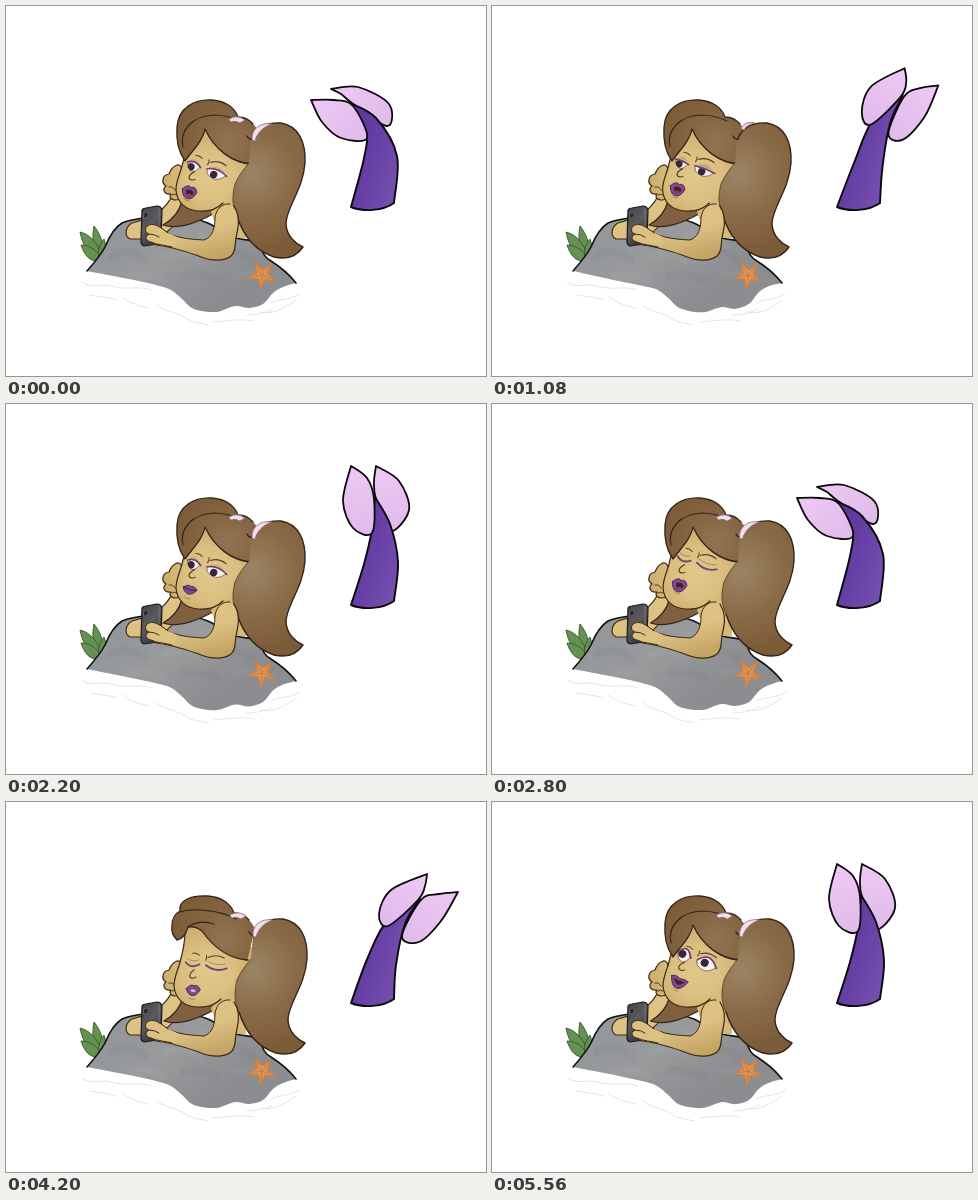
Write an HTML page with a canvas that moves like this. It is 480 px wide and 370 px high and loops after 5600 ms.

```html
<!DOCTYPE html>
<html lang="en">
<head>
<meta charset="utf-8">
<title>Mermaid on a rock</title>
<style>
  html, body { margin: 0; width: 100%; height: 100%; overflow: hidden; background: #fff; }
  canvas { display: block; width: 480px; height: 370px; }
</style>
</head>
<body>
<canvas id="stage"></canvas>
<script>
const LOOP = 5600;
const canvas = document.getElementById('stage');
const ctx = canvas.getContext('2d');
const dpr = window.devicePixelRatio || 1;
canvas.width = 480 * dpr;
canvas.height = 370 * dpr;

const SKIN_LINE = '#3d2b12', HAIR_LINE = '#33241a', TAIL_LINE = '#0c080e';

function withStops(g, stops) {
  stops.forEach((c, i) => g.addColorStop(i / (stops.length - 1), c));
  return g;
}
const radial = (x, y, r, ...stops) => withStops(ctx.createRadialGradient(x, y, 4, x, y, r), stops);
const linear = (x0, y0, x1, y1, ...stops) => withStops(ctx.createLinearGradient(x0, y0, x1, y1), stops);

const hairPaint = radial(246, 168, 80, '#9a8362', '#8a6b48', '#7c5b38');
const capPaint = radial(222, 138, 62, '#8f7350', '#84633f', '#795835');
const skinPaint = radial(204, 170, 48, '#e0c78a', '#dabf80', '#cbab6a');
const armPaint = linear(175, 200, 190, 256, '#dfc384', '#dcc183', '#c4a363');
const rockPaint = linear(120, 212, 190, 305, '#94979a', '#989a9c', '#8b8d90');
const tailPaint = linear(345, 150, 396, 165, '#5f389f', '#6842a6', '#7450ae');

function shape(d, fill, line, width = 1.2) {
  const p = typeof d === 'string' ? new Path2D(d) : d;
  if (fill) { ctx.fillStyle = fill; ctx.fill(p); }
  if (line) { ctx.strokeStyle = line; ctx.lineWidth = width; ctx.stroke(p); }
}
function moved(dx, dy, draw, rot = 0) {
  ctx.save();
  ctx.translate(dx, dy);
  ctx.rotate(rot);
  draw();
  ctx.restore();
}

// Smooth curve through points, with free ends.
function curve(path, pts, start = true) {
  if (start) path.moveTo(...pts[0]);
  for (let i = 0; i < pts.length - 1; i++) {
    const a = pts[i - 1] || pts[i], b = pts[i], c = pts[i + 1], d = pts[i + 2] || c;
    path.bezierCurveTo(
      b[0] + (c[0] - a[0]) / 6, b[1] + (c[1] - a[1]) / 6,
      c[0] - (d[0] - b[0]) / 6, c[1] - (d[1] - b[1]) / 6, c[0], c[1]);
  }
  return path;
}
const points = s => s.split(' ').map(p => p.split(',').map(Number));
const mix = (a, b, k) => a + (b - a) * k;

// Tail poses: body (left edge, tip, right edge) and the two fins.
const pose = (body, a, b) => ({ body: points(body), a: points(a), b: points(b) });
const left = pose('358,152 360,125 344,97 370,112 391,150',
  '305,94 316,116 335,132 361,132 347,100 328,94', '325,83 352,81 383,98 381,120 346,97 335,88');
const upright = pose('358,160 366,125 369,93 384,120 392,158',
  '345,62 337,97 347,124 366,129 368,95 361,74', '370,62 393,77 403,106 384,127 370,95 368,78');
const lean = pose('362,160 380,120 406,90 396,125 391,160',
  '400,60 370,82 365,110 374,123 404,92 407,76', '438,76 429,111 409,136 397,131 407,93 420,80');
const leanMore = pose('362,155 381,119 414,97 399,122 390,163',
  '421,72 385,88 373,112 382,124 412,98 419,84', '452,90 435,119 413,140 396,134 415,98 433,92');
const right = pose('356,155 382,121 432,105 406,120 389,160',
  '449,96 421,88 391,98 383,122 410,107 436,103', '470,117 449,139 426,144 402,137 427,108 447,108');

function between(p, q, k, lift) {
  const blend = (u, v) => u.map(([x, y], i) => [
    mix(x, v[i][0], k), mix(y, v[i][1], k) - (y < 145 ? lift : 0)]);
  return { body: blend(p.body, q.body), a: blend(p.a, q.a), b: blend(p.b, q.b) };
}
const tails = [left, between(left, upright, .6, 8), upright, lean,
  between(lean, leanMore, .6, 5), leanMore, right];

function tailAt(t) {
  // The first swing rests on the left; the second starts at 2960.
  if (t >= 2600 && t < 2960) return left;
  const n = t < 2600 ? Math.max(0, Math.floor(t / 200) - 1)
                     : Math.floor((t - 2960) / 200) + 1;
  const k = n % 12;
  return tails[k > 6 ? 12 - k : k];
}

function drawTail(t) {
  const { body, a, b } = tailAt(t);
  const fin = pts => {
    const p = curve(new Path2D(), [...pts, pts[0]]);
    p.closePath();
    shape(p, linear(...pts[0], ...pts[3], '#efc9f4', '#e0bbea'), TAIL_LINE, 1.8);
  };
  fin(b);
  const p = curve(new Path2D(), [[345, 201], ...body.slice(0, 3)]);
  curve(p, [...body.slice(2), [388, 197]], false);
  p.bezierCurveTo(377, 205, 357, 206, 345, 201);
  p.closePath();
  shape(p, tailPaint, TAIL_LINE, 1.9);
  fin(a);
}

function drawRock(t) {
  const w = Math.sin(t / LOOP * Math.PI * 8);
  const blade = d => shape(d, '#659252', '#36582d', .9);
  blade('M94 255C86 242 86 230 88 220C97 231 98 242 97 254Z');
  blade('M94 255C80 248 76 236 74 226C87 229 94 242 97 254Z');
  blade('M95 255C83 257 78 248 75 239C86 239 93 247 97 254Z');
  blade('M94 255C90 246 94 238 98 233C101 241 100 249 97 256Z');

  const rim = 'M81 265C88 257 95 249 99 241C103 231 108 222 116 217C128 212 150 210 180 211' +
    'C205 214 218 228 230 232C240 235 250 233 254 239C257 247 258 251 265 255C276 262 283 268 290 277';
  const shore = points('290,277 277,281 267,287 257,298 243,302 229,300 210,306 188,303 176,293 165,284 150,279 128,274 102,269 81,265')
    .map(([x, y], i) => [x, y + (i && i < 13 ? 1.2 * w * Math.sin(i) : 0)]);
  const rock = curve(new Path2D(rim), shore, false);
  shape(rock, rockPaint);
  ctx.save();
  ctx.clip(rock);
  for (let i = 0; i < 9; i++) {
    const x = 105 + i * 18, y = 250 + 23 * Math.sin(i * 2.1);
    shape(`M${x} ${y}q18 ${-9 + i % 3 * 5} 34 4`, null, i % 2 ? '#b0b2b420' : '#6e707220', 8);
  }
  ctx.restore();
  shape(rim, null, '#111', 1.6);

  // Pale ripples around the rock
  const ripple = (d, shift) => moved(shift * w, 0, () => shape(d, null, '#d9e5ec', .9));
  ripple('M76 276C84 283 94 277 105 280C121 285 132 279 146 284', .8);
  ripple('M84 289C94 291 103 291 111 294M116 291C125 298 134 300 143 302', -1);
  ripple('M151 299C161 307 170 305 181 313C187 317 195 317 202 319', 1);
  ripple('M207 316C225 314 237 313 248 315M254 306C269 309 277 302 290 294', -1);
  ripple('M265 297C274 292 283 295 294 288M241 309C250 309 260 307 267 303', 1);

  const ray = (i, r) => {
    const a = (-120 + i * 36) * Math.PI / 180;
    return [256 + r * Math.cos(a), 269 + r * Math.sin(a)];
  };
  const star = new Path2D();
  for (let i = 0; i < 10; i++) star.lineTo(...ray(i, i % 2 ? 5.5 : 14));
  star.closePath();
  shape(star, '#dd9558', '#d07f3e', 1.4);
  for (let i = 0; i < 10; i += 2) shape(`M256 269L${ray(i, 9)}`, null, '#c5773a', .8);
}

// Head keys: time, face x, y, turn, fringe shift, lobe shift, eyes
const heads = [
  [0, 199, 163, .33, 0, 0, 'down'],
  [500, 201, 160, .33, 1, 0, 'low'],
  [1300, 199, 163, .33, 0, 0, 'down'],
  [2500, 203, 158, .33, 2, 3, 'shut'],
  [3400, 198, 163, 0, -8, 4, 'shut'],
  [4000, 198, 163, .15, -4, 2, 'shut'],
  [4900, 203, 158, .38, 2, 3, 'up']
];
function headAt(t) {
  const i = heads.findLastIndex(h => h[0] <= t), h = heads[i], next = heads[i + 1];
  const raw = next ? Math.max(0, (t - next[0] + 200) / 200) : 0;
  const k = raw * raw * (3 - 2 * raw);
  const [x, y, rot, fringe, lobe] = [1, 2, 3, 4, 5].map(j => next ? mix(h[j], next[j], k) : h[j]);
  return { x, y, rot, fringe, lobe, eyes: h[6] };
}

function drawEye(x, rx, state) {
  if (state === 'shut') {
    shape(`M${x - rx} 0Q${x} 6 ${x + rx + 1} 0`, null, '#74427a', 1.8);
    shape(`M${x - rx + 1} -4Q${x} -1 ${x + rx - 1} -4`, null, '#a67e5a', .8);
    return;
  }
  const up = state === 'up', top = up ? -7 : state === 'low' ? -1 : -3;
  const eye = new Path2D(`M${x - rx} -1Q${x} ${top * 2} ${x + rx} 0Q${x + 2} 11 ${x - rx + 2} 4Z`);
  if (!up) shape(`M${x - rx} -1Q${x} -11 ${x + rx} 0Z`, '#c9a77a');
  shape(eye, '#f6f1ef', '#705047', .7);
  ctx.save();
  ctx.clip(eye);
  ctx.beginPath();
  ctx.arc(x - 2, up ? -1 : 2.5, up ? 4 : 3.7, 0, 7);
  ctx.fillStyle = '#3b2437';
  ctx.fill();
  ctx.restore();
  shape(`M${x - rx} -1Q${x} ${top * 2} ${x + rx + 1} 0`, null, '#704174', 1.6);
}

function drawMouth(kind) {
  const lip = '#7d4a90', dark = '#4a1c2c', line = '#42234a';
  if (kind === 'o') {
    shape('M-8 0Q-4 -7 0 -4Q4 -7 7 -1Q5 8 -1 8Q-6 7 -8 0Z', lip, line, .8);
    shape('M-4 0Q0 -3 4 0Q4 5 0 5Q-3 5 -4 0Z', dark);
    shape('M-2 4Q1 1 3 3Q2 6 -2 4Z', '#9c4550');
  } else if (kind === 'p') {
    shape('M-7 0Q-3 -6 0 -4Q4 -6 7 -1Q4 6 0 6Q-5 6 -7 0Z', lip, line, .8);
    shape('M-3 1Q0 -2 3 1Q0 4 -3 1Z', '#d6bdd0');
  } else if (kind === 's') {
    shape('M-9 -3Q-4 -6 0 -3Q4 -5 9 -3Q5 8 -1 7Q-6 6 -9 -3Z', lip, line, .8);
    shape('M-6 -2Q1 0 6 -2Q3 4 -1 3Q-4 2 -6 -2Z', dark);
  } else {
    shape('M-7 0Q-3 -5 0 -3Q4 -5 7 -1Q4 5 -1 5Q-6 4 -7 0Z', lip, line, .8);
    shape('M-6 0Q0 2 6 -1', null, '#3b1c42', .9);
  }
}
// One mouth shape every 200 ms
const speech = 'oopccoopcopccooopoopcpcocpos';

function drawFeatures(t, h) {
  moved(h.x, h.y, () => {
    drawEye(-12, 6.5, h.eyes);
    drawEye(12, 10, h.eyes);
    shape('M-9 6Q-14 11 -12 14Q-9 16 -6 13', null, SKIN_LINE, 1);
    shape('M1 -10Q2 -7 1 -5M3 -8Q10 -13 19 -10', null, '#57402a', 1.1);
    shape('M-6 -9Q-9 -11 -13 -10', null, '#57402a', 1);
    moved(-7, 26, () => drawMouth(speech[Math.floor(t / 200)]));
    shape('M-10 35Q-7 37 -4 35', null, '#a48245', .8);
  }, h.rot);
}

// The fringe curls in when the head is turned, and sweeps out when it faces front.
function drawFringe(h) {
  const crown = 'C220 95 229 102 232 111C242 112 249 118 253 127L245 159';
  if (h.rot > .2) {
    shape('M179 155C173 147 170 135 171 121C172 102 188 93 206 94' + crown +
      'C226 157 208 143 199 123C197 135 186 145 179 155Z', capPaint);
    shape('M246 158C226 157 208 143 199 123C197 135 186 145 179 155' +
      'C173 147 170 135 171 121C172 102 188 93 206 94C220 95 229 102 232 111Q241 111 247 118', null, HAIR_LINE, 1.3);
    shape('M177 141C173 124 187 110 207 109C218 109 226 111 234 115', null, HAIR_LINE, 1.1);
  } else {
    shape('M170 124C170 114 174 111 178 109C176 98 190 93 206 94' + crown +
      'C228 157 212 146 200 129Q194 124 186 125C184 132 180 137 175 138C171 134 169 130 170 124Z', capPaint);
    shape('M246 158C228 157 212 146 200 129Q194 124 186 125C184 132 180 137 175 138C171 134 169 130 170 124' +
      'C170 114 174 111 178 109C176 98 190 93 206 94C220 95 229 102 232 111Q241 111 247 118', null, HAIR_LINE, 1.3);
    shape('M178 110C192 105 220 109 234 117M186 125Q197 117 212 122', null, HAIR_LINE, 1.1);
  }
}

function drawLobe() {
  shape('M245 134C250 121 262 116 275 117C292 120 300 135 299 157C297 184 281 200 280 217' +
    'C280 230 290 238 297 241C291 250 281 254 268 251C250 245 238 232 231 210' +
    'C226 200 226 190 229 178C233 169 238 163 243 157Z', hairPaint);
  shape('M241 130Q243 134 246 133C250 121 262 116 275 117C292 120 300 135 299 157C297 184 281 200 280 217' +
    'C280 230 290 238 297 241C291 250 281 254 268 251C250 245 238 232 231 210', null, HAIR_LINE, 1.4);
  shape('M231 210C226 200 226 190 229 178C233 169 238 163 243 157', null, '#5b4228', .9);
}

function drawMermaid(t) {
  const h = headAt(t);
  shape('M166 190C160 202 150 211 126 217C119 221 118 230 124 233L150 233C166 226 178 207 181 194Z', armPaint, SKIN_LINE);
  moved(h.lobe / 2, 0, () =>
    shape('M176 195C173 207 166 214 157 219C171 224 192 217 214 204L229 190Z', '#806040', HAIR_LINE));
  shape('M205 206L222 188L240 190L240 232L214 232Z', '#d6ba79');

  shape('M174 193C166 196 162 191 165 188C158 189 156 183 160 180C155 177 156 169 163 168' +
    'C166 160 174 155 176 163L182 190Z', skinPaint, SKIN_LINE);
  shape('M163 181Q167 180 169 184M166 189Q169 187 171 189', null, SKIN_LINE, .9);

  moved(h.fringe * .5, 0, () => {
    shape('M200 118C184 118 181 128 180 140C179 150 177 156 176 160C174 168 170 175 170 184' +
      'C171 196 179 204 192 205C203 206 211 203 217 197L240 194L256 150Z', skinPaint);
    shape('M181 130Q181 142 176 160C174 168 170 175 170 184C171 196 179 204 192 205C203 206 211 203 217 197',
      null, SKIN_LINE);
  });
  drawFeatures(t, h);

  moved(h.fringe, 0, () => drawFringe(h));
  moved(h.lobe, 0, drawLobe);
  moved(h.lobe / 2, 0, () => {
    if (h.eyes === 'low') {
      shape('M249 122Q254 114 263 117Q256 117 252 124Z', '#e9d7df', '#876976', .7);
      return;
    }
    shape('M223 113Q231 108 239 114L234 117Q229 114 225 116Z', '#f2dfeb', '#876976', .8);
    shape('M246 134C245 123 254 116 266 118C257 121 251 127 249 135Z', '#f2dfeb', '#876976', .8);
  });

  shape('M155 222C165 231 178 233 198 234C207 231 209 221 209 212C210 203 216 197 224 198' +
    'C231 202 234 215 231 227C228 238 231 244 225 250C217 256 204 255 190 249C175 244 162 240 150 239Z', armPaint);
  shape('M155 222C165 231 178 233 198 234C207 231 209 221 209 212C210 203 216 197 224 198', null, SKIN_LINE, 1);
  shape('M228 200C232 206 234 215 231 227C228 238 231 244 225 250C217 256 204 255 190 249C175 244 162 240 150 239',
    null, SKIN_LINE);
  drawPhone();
}

function drawPhone() {
  shape('M136 204Q137 202 140 202L151 200Q155 200 156 204L155 233Q155 237 151 238L138 240Q135 239 135 236Z',
    linear(136, 205, 158, 225, '#47474b', '#5a5a5f', '#38383c'), '#1b1b1e', 1.2);
  shape('M153 202L153 236', null, '#77777c', 1);
  shape('M138 207L142 206L142 211L138 212Z', '#2a2a2d', '#75757a', .6);
  shape('M159 225C153 220 147 216 141 220C138 224 140 227 143 228C138 231 140 235 145 236' +
    'C150 239 160 240 169 240L171 231Z', '#dcc183');
  shape('M162 227C153 220 147 216 141 220C138 224 140 227 143 228C138 231 140 235 145 236' +
    'C151 239 159 239 166 241M143 228Q149 228 153 231', null, SKIN_LINE, 1);
}

function render(t) {
  ctx.setTransform(dpr, 0, 0, dpr, 0, 0);
  ctx.fillStyle = '#fff';
  ctx.fillRect(0, 0, 480, 370);
  ctx.lineCap = ctx.lineJoin = 'round';
  drawRock(t);
  drawMermaid(t);
  drawTail(t);
}

const start = performance.now();
function tick() {
  const t = (performance.now() - start) % LOOP;
  render(Math.floor(t / 40) * 40);
  requestAnimationFrame(tick);
}
tick();
</script>
</body>
</html>
```
